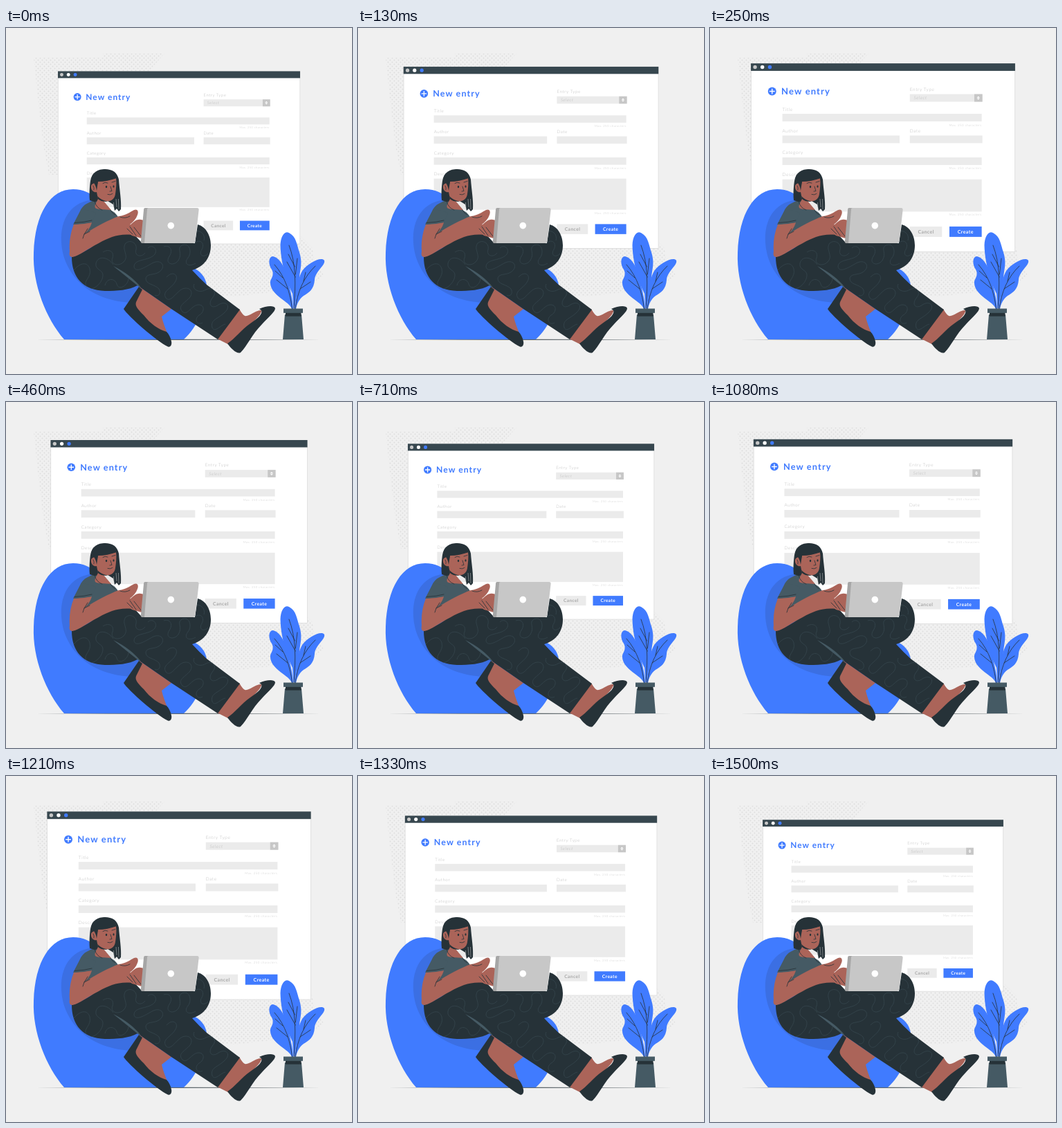
Animation, 500 px wide and 500 px high, one loop 1540 ms. Source, as an HTML page:

```html
<!DOCTYPE html>
<html lang="en">
<head>
<meta charset="utf-8">
<title>New entry</title>
<style>
html, body { margin: 0; width: 100%; height: 100%; overflow: hidden; background: #f0f0f0; }
svg { display: block; width: 100vw; height: 100vh; }
text { font-family: Lato, "Open Sans", sans-serif; text-rendering: geometricPrecision; }
.blue { fill: #407bff; }
.dark { fill: #263238; }
.slate { fill: #455a64; }
.skin { fill: #ab6459; }
.field { fill: #ebebeb; }
.line { fill: none; stroke: #263238; stroke-width: .8; stroke-linecap: round; stroke-linejoin: round; }
.label { font-size: 6.5px; font-weight: 300; letter-spacing: .6px; fill: #b8b8b8; }
.hint { font-size: 4.4px; font-weight: 300; letter-spacing: .45px; fill: #c2c2c2; text-anchor: end; }
.btn { font-size: 7px; font-weight: 700; letter-spacing: .4px; text-anchor: middle; }
</style>
</head>
<body>
<svg viewBox="0 0 500 500" xmlns="http://www.w3.org/2000/svg">
<defs>
  <pattern id="dots" width="6" height="6" patternUnits="userSpaceOnUse">
    <circle cx="1.5" cy="1.5" r="1" fill="#dddddd"/>
    <circle cx="4.5" cy="4.5" r="1" fill="#dddddd"/>
  </pattern>
  <path id="trousers" d="M95 331C112 326 130 312 147 302C158 296 170 294 181 294L196 310L273 311L277 284C289 287 296 300 296 314C296 332 286 345 269 350Q279 361 290 371L338 407L306 450L239 406L190 372C178 379 160 380 143 380C111 379 95 360 95 331Z"/>
  <clipPath id="cloth"><use href="#trousers"/></clipPath>
</defs>

<rect width="500" height="500" fill="#f0f0f0"/>
<path fill="url(#dots)" d="M40 43H140V37H229L205 64L90 100L76 212H62L54 170L46 100Z"/>
<path fill="url(#dots)" d="M250 300H425L443 318L446 340L460 358L446 366L400 380L330 388L270 384Z"/>

<g id="win">
  <rect x="59.3" y="51.3" width="381.5" height="272" fill="#fff" stroke="#d6d6d6" stroke-width=".7"/>
  <rect x="59" y="51.1" width="382" height="10.8" fill="#37474f"/>
  <circle cx="65" cy="56.5" r="2.7" fill="#c7c7c7"/>
  <circle cx="75.6" cy="56.5" r="2.7" fill="#fff"/>
  <circle cx="86.4" cy="56.5" r="2.7" class="blue"/>

  <circle cx="89.700" cy="91.5" r="6" class="blue"/>
  <path d="M86.300 91.5h6.8M89.700 88.1v6.8" stroke="#fff" stroke-width="1.4" stroke-linecap="round"/>
  <text x="103" y="96.2" font-size="13" font-weight="700" letter-spacing="1.15" class="blue">New entry</text>
  <g id="form"></g>
  <text x="294.5" y="103.4" class="label" font-style="italic">Select</text>
  <rect x="382" y="95.5" width="11.7" height="11" fill="#c7c7c7"/>
  <path d="M387.8 98.4l2.2 2.2h-4.4zM387.8 103.6l2.2 -2.2h-4.4z" fill="#fff"/>

  <rect x="288.8" y="286.9" width="46.5" height="15" class="field"/>
  <text x="312.2" y="296.8" class="btn" fill="#a8a8a8">Cancel</text>
  <rect x="346" y="286.9" width="46.7" height="15" class="blue"/>
  <text x="369.4" y="296.8" class="btn" fill="#fff">Create</text>
</g>

<path d="M42 450.2L250 449.700L456 450.2L250 450.700Z" class="dark"/>

<g id="bag">
  <path class="blue" d="M84 450C58 420 38 370 40 325C42 268 64 233 97 233C112 233 123 238 131 249L200 320L270 346C282 352 289 361 290 372C289 402 277 432 257 450Z"/>
  <path fill="#3b6fe3" d="M128 248C95 250 78 275 80 310C82 350 115 398 191 397L215 370L160 290Z"/>
</g>

<g id="backFoot">
  <path class="skin" d="M193 374L239 406L225 417C227 426 230 433 233 441L215 437L184 404Z"/>
  <path class="dark" d="M192 374L170 406C176 416 218 453 234 460.500C238 462 240 457 239 453C238 447 235 442 232 439C221 436 208 427 199 415C191 407 186 402 188 396L197 378Z"/>
</g>

<g id="frontFoot">
  <path class="skin" d="M337 406C341 412 343 417 348 416C357 413 363 407 369 408C371 414 350 432 321 457L305 449Z"/>
  <path class="dark" d="M366 406C375 402 387 400 389 405C389 410 380 417 370 428C355 443 349 459 339 469C334 472 325 463 320 456C331 449 340 436 353 427C365 419 371 413 369 408Z"/>
</g>

<g id="body">
  <path class="slate" d="M129 248C121 252 112 254 108 263L97 284L106 286L105 320L150 312L165 288L163 276C161 270 157 266 151 263Z"/>
  <use href="#trousers" class="dark"/>
  <g clip-path="url(#cloth)" fill="none" stroke="#37474f" stroke-width=".8">
    <path d="M98 350C108 338 118 338 121 348C124 361 111 365 116 373C123 383 139 370 140 358C141 349 128 350 130 340C133 328 148 331 155 342"/>
    <path d="M140 324C149 318 157 324 154 332C150 341 162 346 170 338C179 329 166 320 173 311C180 305 190 311 188 320C185 330 196 332 201 325"/>
    <path d="M143 372C146 360 158 362 160 370C163 381 177 371 177 362"/>
    <path d="M205 318C211 312 220 319 215 327C207 337 185 333 185 345C187 355 202 345 211 340C222 334 230 341 225 349C218 359 205 353 202 361C201 371 215 370 221 377C225 384 219 389 215 386"/>
    <path d="M228 316C237 313 242 321 236 330C229 341 242 345 249 336C256 325 246 319 254 314C266 309 269 325 263 332C256 341 264 346 274 340"/>
    <path d="M271 312C280 303 288 311 283 320C278 328 285 333 292 326M276 293C284 294 288 300 286 307"/>
    <path d="M232 360C241 350 250 357 245 366C239 377 225 380 231 390C238 398 245 382 255 377C266 373 272 382 265 390C256 399 248 402 255 410C262 416 267 402 277 400C288 399 287 411 279 415C271 421 276 430 284 426"/>
    <path d="M272 370C268 378 280 384 289 378C299 373 305 382 299 389C290 400 298 407 307 400C318 393 326 402 316 411C306 421 295 421 298 433C302 441 310 429 317 428"/>
  </g>
  <path class="slate" d="M155 344C166 353 180 364 191 373L195 375C187 364 172 352 155 344Z"/>
</g>

<g id="head">
  <path class="dark" d="M121 249C120 239 121 228 122 221C124 208 133 204 143 204C154 204 161 209 163 219C164 234 167 249 166 262L163 265L160 261L157 264L155 255L147 250L127 251Z"/>
  <path class="skin" d="M132 226C128 222 122 225 123 231C124 236 128 238 131 237L133 247C131 252 127 256 129 260C133 263 142 262 152 263L141 250C150 252 157 248 158 240C159 232 160 225 159 217C147 220 139 221 133 221Z"/>
  <path class="dark" d="M131 235L133 222C142 222 151 220 160 217L157 208L142 204L126 211L124 226L127 224Q130 228 131 235ZM132 243Q139 250 147 250.500Q139 252 133 247Z"/>
  <path class="line" d="M140 224.500Q143 222 147 224M153 223L158 221.500M151 229L153 235.500L150 236M147 240.500Q151 242 154 239.500M126 228Q128 231 127 234"/>
  <ellipse cx="145" cy="229.500" rx="1.2" ry="1.8" class="dark"/>
  <ellipse cx="155.500" cy="229" rx="1.1" ry="1.7" class="dark"/>
  <path d="M155.500 252L156 261M159 247L160 259M162.500 247L163 262" stroke="#eee" stroke-width=".4"/>
  <path class="line" d="M128 250Q130 260 139 263M151 263Q154 269 158 270"/>
</g>

<g id="arms">
  <path class="skin" d="M171 291C179 287 185 277 191 277C195 276 198 278 200 278L196 304L182 300Z"/>
  <path class="skin" d="M98 284L124 281C122 289 117 294 113 298C130 287 149 277 163 272C173 271 179 266 185 263C190 261 192 265 190 270C188 276 184 280 179 284L188 285L182 299C162 297 149 303 134 311C118 319 106 329 96 331C92 331 91 328 92 323C91 310 93 296 98 284Z"/>
  <path class="slate" d="M109 261L98 284Q111 284 124 281L130 267Z"/>
  <path class="line" d="M99 281.500Q113 281 124 278M118 290L113 298L111 304M113 298L121 294M175 290L183 298M179 287L188 300M185 288L195 301M165 273Q172 276 179 272"/>
</g>

<g id="laptop">
  <path fill="#a6a6a6" d="M201 260H206L202 311H197Q194 311 195 307L199 263Q199 260 201 260Z"/>
  <path fill="#c7c7c7" d="M206 260H276Q279 260 278.600 263L273.500 308Q273 311 270 311H200L204 262Q204 260 206 260Z"/>
  <circle cx="238.300" cy="285.600" r="4.8" fill="#fff"/>
</g>

<g id="plant">
  <path class="blue" d="M414 384C406 368 397 340 396.500 314C397 300 403 293 409 296C420 302 420 313 424 324C429 340 425 348 424 361C423 374 420 384 417.500 405H415.500Z"/>
  <path class="blue" d="M413 406C410 395 383 387 382 369C381 363 389 358 384 349C379 342 379 331 385 330C395 331 403 345 407 362C410 378 415 392 415 406Z"/>
  <path class="blue" d="M417 406C421 390 419 367 428 351C437 339 456 330 460 336C462 343 447 351 446 364C445 378 438 382 430 387C423 392 420 400 419 406Z"/>
  <path class="line" d="M409 314C419 340 419 370 416 406M417.500 345L408 327M418.300 360L406 338M418.400 356L421 333M388 342C404 360 411 384 413.500 406M400 361L389 351M407 377L391 364M447 344C430 360 421 382 418 406M430 366L433 353M425 377L440 367"/>
  <path class="slate" d="M403 414H427L430 450H400Z"/>
  <rect x="404" y="411" width="22.500" height="5.600" class="dark"/>
  <rect x="401" y="405.500" width="28" height="6.300" class="slate"/>
</g>
</svg>
<script>
const form = document.getElementById("form");
const win = document.getElementById("win");

// label, left, label baseline, field right, field top, field height, hint baseline
const fields = [
  ["Entry Type", 288.8, 90.6, 393.7, 95.5, 11, 0],
  ["Title", 104.5, 119.5, 392.7, 124, 11, 141.5],
  ["Author", 104.5, 150.6, 274, 155.4, 11, 0],
  ["Date", 288.8, 150.6, 393.7, 155.4, 11, 0],
  ["Category", 104.5, 182.4, 392.7, 187, 11, 204.5],
  ["Description", 104.5, 214, 392.7, 218.7, 46.7, 271.5]
];
form.innerHTML = fields.map(([name, x, base, right, top, h, hint]) =>
  `<text x="${x}" y="${base}" class="label">${name}</text>
   <rect x="${x}" y="${top}" width="${right - x}" height="${h}" class="field"/>` +
  (hint ? `<text x="392.7" y="${hint}" class="hint">Max. 250 characters</text>` : "")
).join("");

const LOOP = 1540, STEPS = 37;
// time and beat phase: even phases are smallest, odd phases largest
const beat = [[0, .183], [250, .96], [460, 1.384], [710, 1.667],
              [1080, 2.68], [1330, 3.5], [1500, 4.09], [LOOP, 4.183]];

function phaseAt(t) {
  const i = beat.findIndex(([end]) => end > t);
  const [t0, p0] = beat[i - 1], [t1, p1] = beat[i];
  return p0 + (p1 - p0) * (t - t0) / (t1 - t0);
}

function draw(now) {
  const step = Math.floor((now % LOOP + 4) / LOOP * STEPS) % STEPS;
  const swell = (1 - Math.cos(Math.PI * phaseAt(step * LOOP / STEPS))) / 2;
  const k = .909 + .091 * swell;
  win.setAttribute("transform", `translate(250 187.3) scale(${k}) translate(-250 -187.3)`);
}

let start;
function tick(now) {
  start ??= now;
  draw(Math.max(0, now - start));
  requestAnimationFrame(tick);
}
draw(0);
requestAnimationFrame(tick);
</script>
</body>
</html>
```
